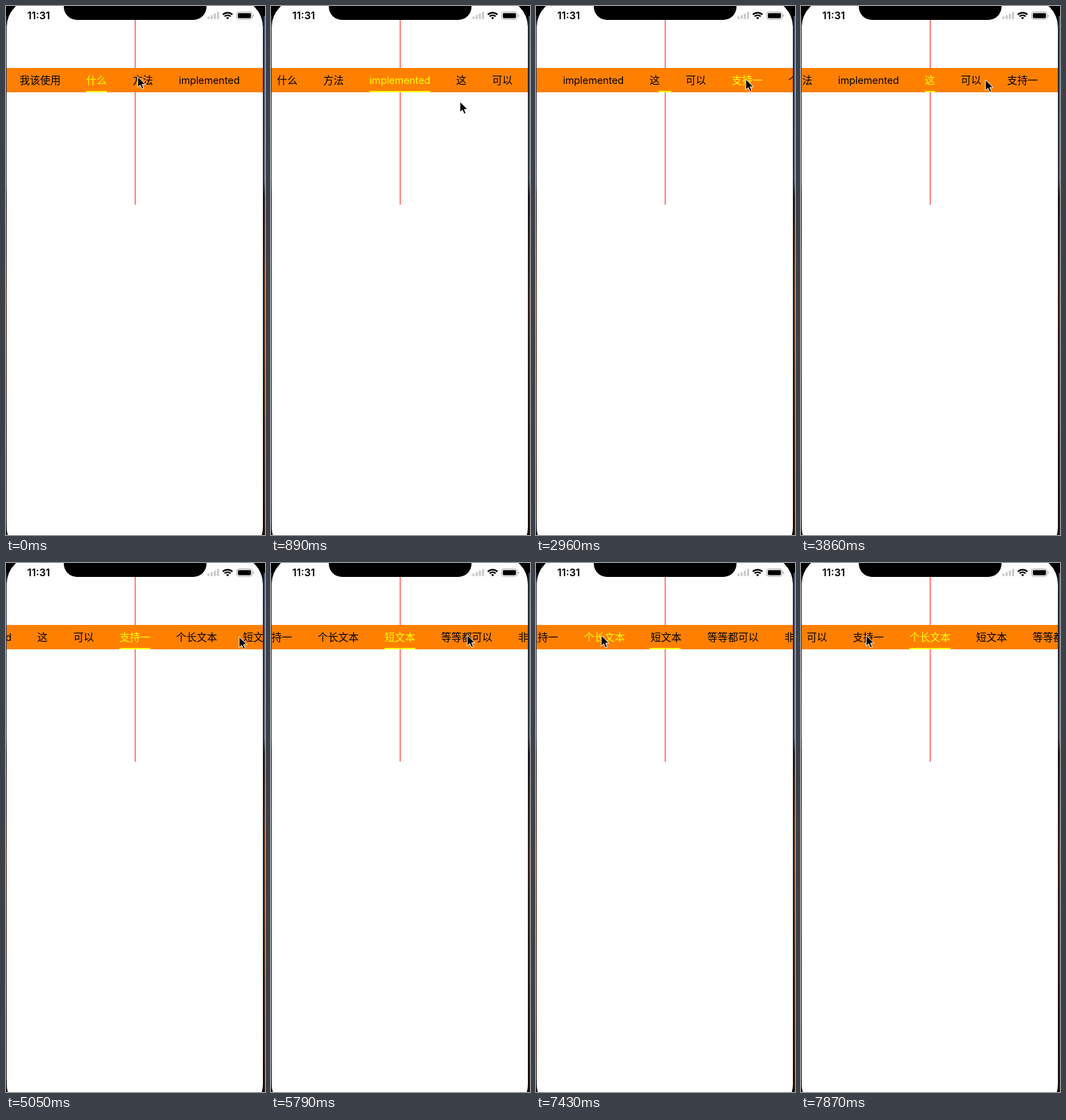
Write an HTML page that moves like this. It is 372 by 760 pixels and loops after 8000 ms.

```html
<!DOCTYPE html>
<html lang="zh">
<head>
<meta charset="utf-8">
<style>
  html, body { margin: 0; width: 100%; height: 100%; overflow: hidden; background: #000; }
  svg { display: block; width: 372px; height: 760px; }
  text { font: 14.76px "Noto Sans CJK SC", "Noto Sans CJK", sans-serif; white-space: pre; }
  .latin { font: 14.3px Inter, sans-serif; }
  .clock { font: 600 14.76px Inter, sans-serif; }
</style>
</head>
<body>
<svg viewBox="0 0 372 760">
  <defs>
    <linearGradient id="wall" x2="0" y2="1">
      <stop offset="0" stop-color="#3a4c6c"/>
      <stop offset=".33" stop-color="#5d6478"/>
      <stop offset=".36" stop-color="#2a2428"/>
      <stop offset=".55" stop-color="#6a3412"/>
      <stop offset="1" stop-color="#2c160a"/>
    </linearGradient>
    <clipPath id="clip"><rect x="1" y="89" width="368" height="35"/></clipPath>
  </defs>
  <rect width="372" height="760" fill="url(#wall)"/>
  <rect x=".7" y="-20" width="369.3" height="820"/>
  <path d="M0 0H372V14H0ZM0 742H3V760H0Z"/>
  <rect x="1" y="-10" width="368" height="799" rx="40" fill="#fff"/>
  <path d="M185.5 0V285.5" stroke="#f22"/>
  <rect x="83" y="-40" width="205" height="60" rx="19"/>

  <text class="clock" x="30.5" y="18.8">11:31</text>
  <path d="M289.3 15.2h3v3.6h-3zM293.9 13.3h3v5.5h-3zM298.5 11h3v7.8h-3zM303.1 8.5h3v10.3h-3z" fill="#c9c9c9"/>
  <path d="M311.4 12.4a9.8 9.8 0 0 1 13.8 0M313.9 15.1a6.2 6.2 0 0 1 8.8 0" fill="none" stroke="#000" stroke-width="2.2"/>
  <path d="M318.3 19.2l-2.2-2.3a3.3 3.3 0 0 1 4.4 0z"/>
  <rect x="331.4" y="8.6" width="22" height="10.4" rx="2.8" fill="none" stroke="#a6a6a6"/>
  <rect x="333" y="10.2" width="18.8" height="7.2" rx="1.4"/>
  <path d="M354.8 12.1q1.5 .5 1.5 1.8t-1.5 1.8z" fill="#a6a6a6"/>

  <g clip-path="url(#clip)">
    <rect x="1" y="89" width="368" height="35" fill="#ff8000"/>
    <g id="strip"><rect id="mark" y="122" height="2" fill="#ff0"/></g>
  </g>
  <path id="cursor" d="M0 0V15.4L3.6 12.1 6.1 17.8 8.7 16.7 6.3 11.1H11Z" stroke="#fff" stroke-linejoin="round"/>
</svg>
<script>
const LOOP = 8000, TICK = 148.5, SLIDE = 300;
const EM = 14.76, LATIN_EM = 7.964, GAP = 36.9, MIDDLE = 185.2;
const labels = ['我该使用', '什么', '方法', 'implemented', '这', '可以', '支持一',
  '个长文本', '短文本', '等等都可以', '非常awesome'];

// Each tap: when, on which label, how far along it, and the pointer's height.
const taps = [
  { at: 80, label: '方法', along: .25, y: 101.5 },
  { at: 590, label: 'implemented', along: .4, y: 106 },
  { at: 1800, label: '这', along: .1, y: 101.5, dip: 50 },
  { at: 2908, label: '支持一', along: .12, y: 105, dip: 14 },
  { at: 3430, label: '这', along: .5, y: 106 },
  { at: 4220, label: '支持一', along: .88, y: 106 },
  { at: 5260, label: '短文本', along: -.12, y: 106 },
  { at: 5800, label: '等等都可以', along: .51, y: 103.5 },
  { at: 6735, label: '短文本', along: .1, y: 109, dip: 8 },
  { at: 7400, label: '个长文本', along: .45, y: 104 },
];

const byId = id => document.getElementById(id);
const svgNode = (tag, attrs, parent) => {
  const node = document.createElementNS('http://www.w3.org/2000/svg', tag);
  for (const key in attrs) node.setAttribute(key, attrs[key]);
  return parent.appendChild(node);
};
const mix = (a, b, p) => a + (b - a) * p;
const smooth = p => p * p * (3 - 2 * p);
const progress = (t, start, end) => Math.min(1, Math.max(0, (t - start) / (end - start)));
const strip = byId('strip'), mark = byId('mark'), cursor = byId('cursor');

let nextX = 19.4;
const items = labels.map(label => {
  const x = nextX;
  const node = svgNode('text', { x, y: 111.7 }, strip);
  let width = 0;
  for (const run of label.match(/[a-z]+|[^a-z]+/g)) {
    const latin = /[a-z]/.test(run);
    svgNode('tspan', latin ? { class: 'latin' } : {}, node).textContent = run;
    width += run.length * (latin ? LATIN_EM : EM);
  }
  nextX += width + GAP;
  return { x, width, node, scroll: Math.max(0, x + width / 2 - MIDDLE) };
});

// Where the pointer meets each label follows from the scroll before the tap.
let current = items[1];
for (const tap of taps) {
  tap.from = current;
  tap.to = current = items[labels.indexOf(tap.label)];
  tap.x = tap.to.x + tap.to.width * tap.along - tap.from.scroll;
}

function movePointer(t, last, next) {
  const p = progress(t, last.at + 100, next.at - 200);
  const x = mix(last.x, next.x, smooth(p));
  const y = mix(last.y, next.y, smooth(p)) + (next.dip || 0) * Math.sin(Math.PI * p);
  cursor.setAttribute('transform', `translate(${x} ${y})`);
}

function draw(t) {
  const done = taps.filter(tap => tap.at <= t).length;
  const last = taps[Math.max(0, done - 1)];
  const { from, to } = last;
  const p = smooth(progress(t, last.at, last.at + SLIDE));
  strip.setAttribute('transform', `translate(${-mix(from.scroll, to.scroll, p)} 0)`);
  mark.setAttribute('x', mix(from.x, to.x, p));
  mark.setAttribute('width', mix(from.width, to.width, p));
  const chosen = done ? to : from;
  for (const item of items) item.node.setAttribute('fill', item === chosen ? '#ff0' : '#000');
  movePointer(t, last, taps[done] || last);
}

// The screen refreshes in even ticks.
const begin = performance.now();
function loop() {
  const t = (performance.now() - begin) % LOOP;
  draw(Math.floor((t + 12) / TICK) * TICK);
  requestAnimationFrame(loop);
}
loop();
</script>
</body>
</html>
```
